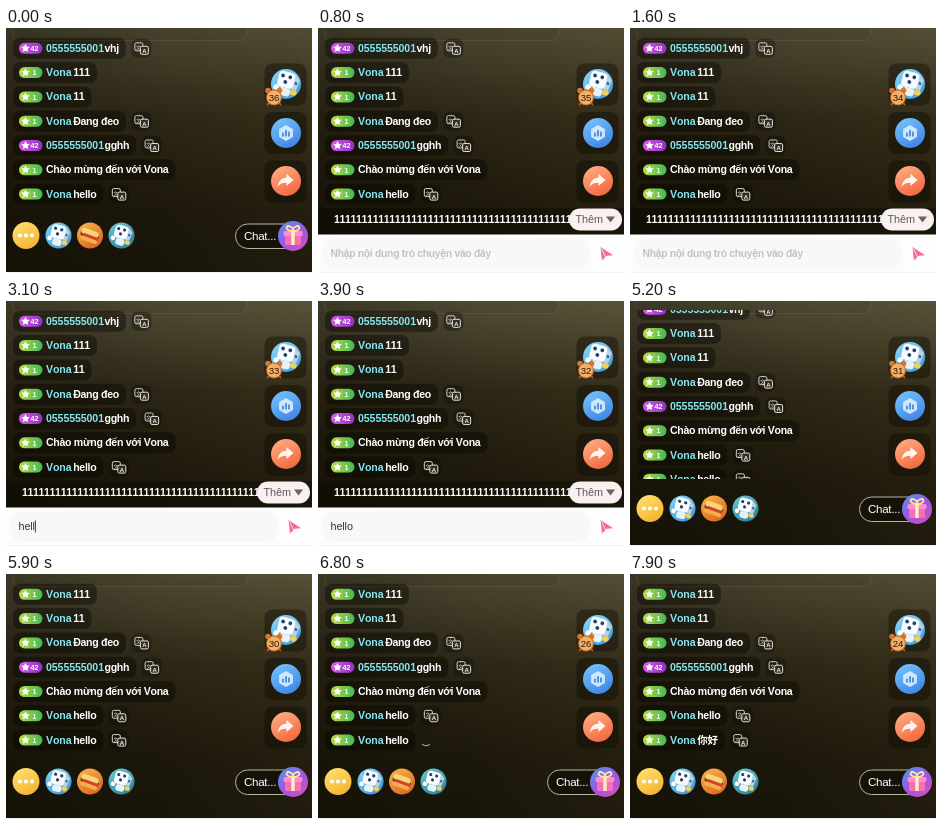
An HTML page with a canvas that plays this animation: 306x245 px, repeating every 8000 ms.

```html
<!DOCTYPE html>
<html lang="vi">
<head>
<meta charset="utf-8">
<title>Live chat</title>
<style>
html, body { margin: 0; width: 100%; height: 100%; overflow: hidden; background: #1d190e; }
canvas { display: block; width: 306px; height: 245px; }
</style>
</head>
<body>
<canvas id="stage"></canvas>
<script>
const W = 306, H = 245, LOOP = 8000, ROW = 24.3;
const OPEN = 700, CLOSE = 4900, SENT = 5150, LOADING = 6500, TRANSLATED = 7600;
const FONT = '"Liberation Sans", "Noto Sans CJK SC", "Noto Sans CJK", Arial, sans-serif';
const TIGHT = -0.32;
const canvas = document.getElementById('stage');
const c = canvas.getContext('2d');
const dpr = window.devicePixelRatio || 1;
canvas.width = W * dpr;
canvas.height = H * dpr;
c.fontKerning = 'none';

const USER = 'Vona', PHONE = '0555555001';
const messages = [
  { name: PHONE, text: 'vhj', icon: true },
  { name: USER, text: '111' },
  { name: USER, text: '11' },
  { name: USER, text: 'Đang đeo', icon: true },
  { name: PHONE, text: 'gghh', icon: true },
  { name: '', text: 'Chào mừng đến với ' + USER },
  { name: USER, text: 'hello', icon: true },
  { name: USER, text: 'hello', icon: true, last: true }
];
const keys = [[2200, 'h'], [2500, 'he'], [2800, 'hel'], [3000, 'hell'], [3400, 'hello']];
const ticks = [[0, 36], [600, 35], [1500, 34], [2500, 33], [3600, 32], [4500, 31],
  [5500, 30], [6400, 26], [7100, 25], [7700, 24]];

function at(list, t, start) {
  let v = start;
  for (const [time, value] of list) if (t >= time) v = value;
  return v;
}

function box(x, y, w, h, r, fill, stroke) {
  c.beginPath();
  c.roundRect(x, y, w, h, r);
  if (fill) { c.fillStyle = fill; c.fill(); }
  if (stroke) { c.strokeStyle = stroke; c.stroke(); }
}

function disc(x, y, r, fill) {
  c.beginPath();
  c.arc(x, y, r, 0, Math.PI * 2);
  c.fillStyle = fill;
  c.fill();
}

function poly(points, fill) {
  c.beginPath();
  points.forEach(([x, y]) => c.lineTo(x, y));
  c.closePath();
  c.fillStyle = fill;
  c.fill();
}

function grad(x0, y0, x1, y1, ...colors) {
  const g = c.createLinearGradient(x0, y0, x1, y1);
  colors.forEach((color, i) => g.addColorStop(i / (colors.length - 1), color));
  return g;
}

function textWidth(s, size, weight, spacing = 0) {
  c.font = `${weight} ${size}px ${FONT}`;
  c.letterSpacing = spacing + 'px';
  return c.measureText(s).width;
}

function label(s, x, y, size, color, weight = 'normal', align = 'left', spacing = 0) {
  const w = textWidth(s, size, weight, spacing);
  c.textAlign = align;
  c.fillStyle = color;
  c.fillText(s, x, y);
  return w;
}

function star(x, y, r, fill) {
  const pts = [];
  for (let i = 0; i < 10; i++) {
    const a = i * Math.PI / 5 - Math.PI / 2, q = i % 2 ? r * 0.5 : r;
    pts.push([x + q * Math.cos(a), y + q * Math.sin(a)]);
  }
  poly(pts, fill);
}

function background(t) {
  c.fillStyle = grad(0, 0, 0, H, '#453f2a', '#352f1c', '#2a2412', '#1e190b', '#1a160a');
  c.fillRect(0, 0, W, H);
  const glow = 0.22 + 0.14 * (0.5 - 0.5 * Math.cos(t / LOOP * Math.PI * 2));
  c.fillStyle = grad(0, 0, 0, 90, `rgba(124,118,88,${glow})`, 'rgba(124,118,88,0)');
  c.fillRect(0, 0, W, 90);
  c.fillStyle = grad(0, 0, W, 0, 'rgba(8,7,2,.32)', 'rgba(8,7,2,.1)', 'rgba(90,80,45,.1)');
  c.fillRect(0, 0, W, H);
  c.lineWidth = 1;
  box(7, -12, 234, 24.5, 8, 'rgba(20,17,8,.06)', 'rgba(140,132,100,.22)');
}

function badge(y, high) {
  const colors = high ? ['#d65be4', '#8e35c4'] : ['#b9d944', '#45b956'];
  box(13, y - 5.5, 23.5, 11, 5.5, grad(13, 0, 36, 0, ...colors));
  star(19.5, y, 4.4, '#fff');
  label(high ? '42' : '1', 28.5, y + 2.7, 7.2, '#fff', 'bold', 'center');
}

function translateIcon(x, y) {
  box(x - 10, y - 9.5, 20, 19, 6, 'rgba(8,6,2,.3)');
  c.lineWidth = 1;
  box(x - 6.5, y - 5.5, 8, 8, 1.5, null, '#d5d2ca');
  box(x - 1, y - 2, 8, 8, 1.5, '#332d20', '#e2e0da');
  label('A', x + 3, y + 4.5, 6, '#eee', 'bold', 'center');
  label('文', x - 3, y + 0.5, 5, '#ddd', 'normal', 'center');
}

function row(m, y, t) {
  const text = m.last && t >= TRANSLATED ? '你好' : m.text;
  const nameW = m.name ? textWidth(m.name, 10.6, 'bold', -0.1) + (m.name === USER ? 1.7 : 0.6) : 0;
  const end = 40 + nameW + textWidth(text, 10.6, 'bold', TIGHT);
  box(7, y - 10.5, end, 21, 7, 'rgba(8,6,2,.42)');
  badge(y, m.name === PHONE);
  label(m.name, 40, y + 3.5, 10.6, '#86e6ee', 'bold', 'left', -0.1);
  label(text, 40 + nameW, y + 3.5, 10.6, '#fff', 'bold', 'left', TIGHT);
  if (!m.icon) return;
  if (m.last && t >= LOADING && t < TRANSLATED) {
    const a = (t - 6800) / 1000 * Math.PI * 2 + 0.8;
    c.beginPath();
    c.arc(108, y, 5.5, a, a + 1.5);
    c.lineWidth = 1.1;
    c.strokeStyle = '#b9b4a7';
    c.stroke();
  } else {
    translateIcon(end + 22.5, y);
  }
}

function chat(t) {
  const p = Math.max(0, Math.min(1, (t - SENT) / 250));
  const shift = ROW * (1 - (1 - p) ** 3);
  c.save();
  c.beginPath();
  c.rect(0, 9, W, 169);
  c.clip();
  messages.forEach((m, i) => {
    if (!m.last || p > 0) row(m, 20.3 + i * ROW - shift, t);
  });
  c.restore();
}

function die(x, y, s) {
  c.save();
  c.translate(x, y);
  c.scale(s, s);
  c.rotate(0.25);
  poly([[4, -9], [9, -5], [8, 3], [4, 3]], '#b9d3e6');
  box(-7, -9, 12, 12, 3, '#f9fcff');
  box(-4, 3, 8, 6, 2, '#e8f1f7');
  box(-9, 2, 4, 4, 2, '#fff');
  box(4, 3, 5, 4, 2, '#f3cf55');
  disc(-4, -5.5, 1.4, '#24405c');
  disc(1.5, -5.5, 1.4, '#24405c');
  disc(-1.2, -1.2, 1.4, '#24405c');
  disc(6.7, -2, 1.1, '#3d6284');
  c.restore();
}

function clock(n) {
  disc(262, 62.5, 2.8, '#d9782b');
  disc(273.5, 62.5, 2.8, '#d9782b');
  c.lineWidth = 2;
  c.strokeStyle = '#a9571c';
  c.beginPath();
  c.moveTo(263, 75); c.lineTo(261, 77);
  c.moveTo(273, 75); c.lineTo(275, 77);
  c.stroke();
  disc(268, 69.5, 8, '#bd6a2a');
  disc(268, 69.5, 6.9, '#f2b069');
  label(n, 268, 73, 9.6, '#2c1608', 'normal', 'center');
}

function sideButtons(t) {
  for (const y of [35.5, 84, 132.5]) box(258.5, y, 42, 42, 8, 'rgba(10,8,4,.4)');

  disc(280, 56, 15, grad(270, 42, 290, 71, '#86d4f5', '#3c9bdc'));
  die(280.5, 56, 1.35);
  clock(at(ticks, t, 36));

  disc(280, 105, 15, grad(272, 90, 288, 120, '#74c0fa', '#3d83e6'));
  const hex = [];
  for (let i = 0; i < 6; i++) {
    const a = i * Math.PI / 3 + Math.PI / 6;
    hex.push([280 + 8 * Math.cos(a), 105 + 8 * Math.sin(a)]);
  }
  poly(hex, '#cfe6fd');
  [[276, 4], [279, 6.5], [282, 5]].forEach(([x, h]) => box(x, 108.5 - h, 2, h, 0.6, '#4a94ea'));

  disc(280, 153, 15, grad(272, 138, 288, 168, '#ffab80', '#f2653d'));
  c.beginPath();
  c.moveTo(280.5, 146);
  c.lineTo(287.5, 152);
  c.lineTo(280.5, 158);
  c.lineTo(280.5, 154.8);
  c.quadraticCurveTo(274.5, 154.5, 271.5, 159);
  c.quadraticCurveTo(272.5, 150, 280.5, 149.4);
  c.closePath();
  c.fillStyle = '#fff5ee';
  c.fill();
}

function toolbar() {
  disc(20, 207.5, 13.5, grad(12, 195, 28, 221, '#ffdf6c', '#f4b02d'));
  [14, 20, 26].forEach(x => disc(x, 207.5, 2.1, '#fff'));

  disc(52.5, 207.5, 13, grad(44, 195, 62, 220, '#7fd0f4', '#3b97d8'));
  die(52.5, 207.5, 1.15);

  disc(84, 207.5, 13, grad(76, 195, 92, 220, '#f9b247', '#d9631f'));
  c.save();
  c.translate(84, 208);
  c.rotate(0.35);
  box(-10, -5, 19, 9, 4.5, '#8f3215');
  box(-10, -6, 18, 6, 3, '#f7d67a');
  box(-7, -1, 16, 3, 1.5, '#d6402a');
  box(-9, 2, 18, 4, 2, '#f2b04c');
  c.restore();

  disc(115.5, 207.5, 13, grad(107, 195, 124, 220, '#65c6cf', '#287f9b'));
  die(115.5, 207.5, 1.1);

  c.lineWidth = 1;
  box(229.5, 196, 70, 24.5, 12.2, 'rgba(10,8,4,.45)', '#b8b3a6');
  label('Chat...', 238, 211.8, 11.6, '#fff', 'normal', 'left', -0.3);

  disc(287, 208, 15, grad(277, 195, 297, 222, '#5c8cf0', '#9a56e0', '#d34fc8'));
  box(279, 207, 16, 10, 1.5, '#f56fb5');
  box(277.5, 203, 19, 5, 1.5, '#ff8ec8');
  box(285.3, 203, 3.4, 14, 0, '#fff0b8');
  c.strokeStyle = '#ffe3a1';
  c.lineWidth = 1.8;
  c.beginPath();
  c.ellipse(283.7, 200.5, 3.3, 2, 0.5, 0, Math.PI * 2);
  c.moveTo(293.6, 198.9);
  c.ellipse(290.3, 200.5, 3.3, 2, -0.5, 0, Math.PI * 2);
  c.stroke();
}

function inputBar(t) {
  c.fillStyle = 'rgba(8,6,2,.3)';
  c.fillRect(0, 180, W, 27);
  label('1'.repeat(46), 16, 194.8, 10.5, '#fff', 'bold', 'left', TIGHT);
  box(251, 180.5, 53, 22, 11, '#f8f1f0');
  label('Thêm', 257.5, 195, 10.8, '#5f5a59');
  poly([[288, 188.5], [297, 188.5], [292.5, 194.5]], '#6b6564');

  c.fillStyle = '#fdfdfd';
  c.fillRect(0, 206.5, W, 39);
  box(5, 210.5, 266, 30, 10, '#f8f8f8');
  const typed = at(keys, t, '');
  if (typed) label(typed, 12.5, 228.8, 10.8, '#333', 'normal', 'left', -0.1);
  else label('Nhập nội dung trò chuyện vào đây', 12.5, 228.8, 10.3, '#c2c2c2', 'bold', 'left', -0.26);
  if (Math.floor(t / 500) % 2 === 0) {
    const x = 12.5 + (typed ? textWidth(typed, 10.8, 'normal', -0.1) : 0);
    c.fillStyle = '#444';
    c.fillRect(x, 219.5, 1, 12);
  }
  poly([[282.5, 219], [295, 227.3], [288.8, 227.8], [284, 232.5]], '#f4698c');
  c.beginPath();
  c.moveTo(283.5, 220.5);
  c.lineTo(287.5, 229);
  c.lineWidth = 0.8;
  c.strokeStyle = '#fdfdfd';
  c.stroke();
}

function draw(t) {
  c.setTransform(dpr, 0, 0, dpr, 0, 0);
  background(t);
  chat(t);
  sideButtons(t);
  if (t >= OPEN && t < CLOSE) inputBar(t);
  else toolbar();
  c.fillStyle = '#f2f1ee';
  c.fillRect(0, 244, W, 1);
}

const start = performance.now();
function loop() {
  draw((performance.now() - start) % LOOP);
  requestAnimationFrame(loop);
}
loop();
</script>
</body>
</html>
```
